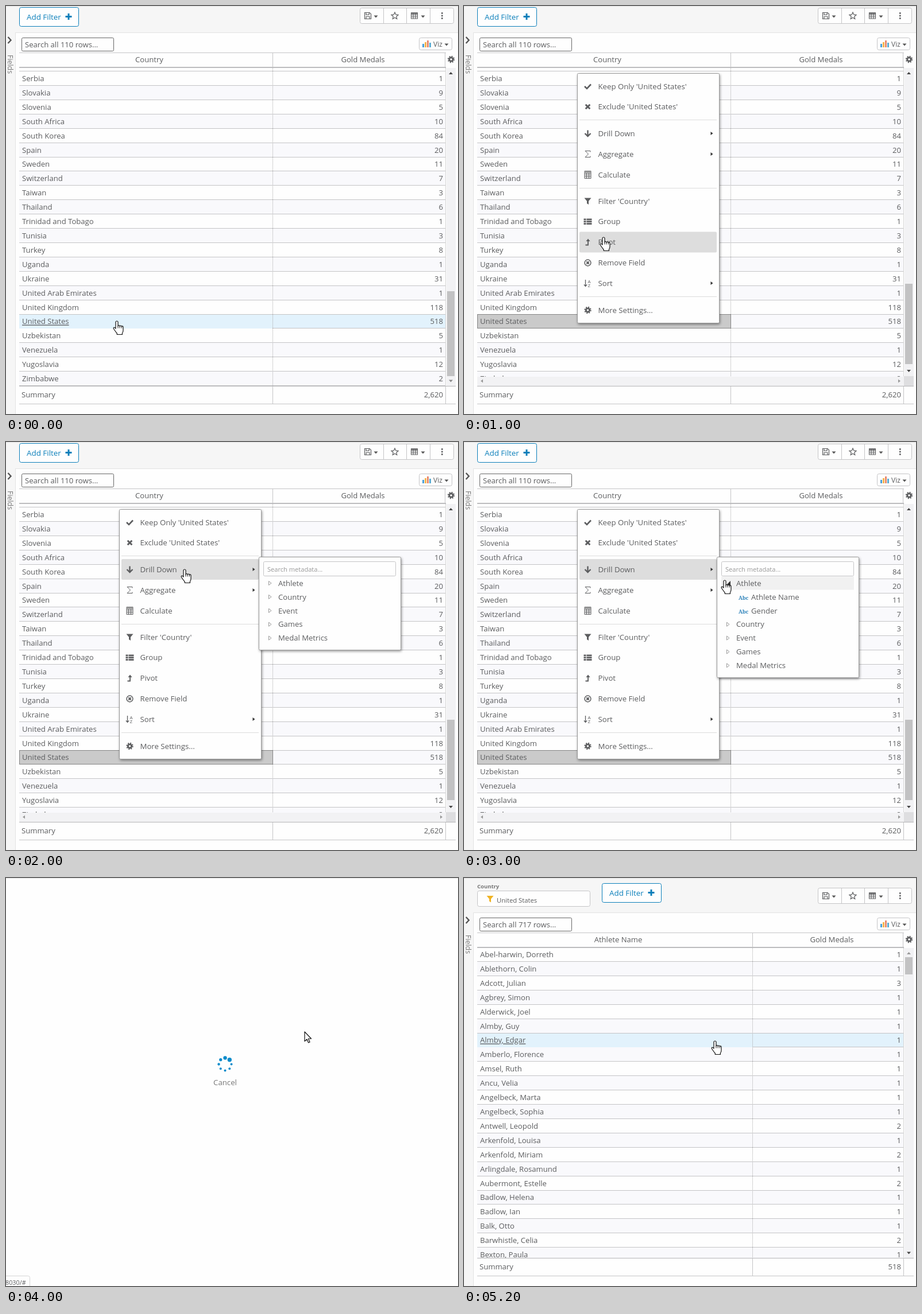
An HTML page that plays this animation: 787 px wide and 711 px high, repeating every 5400 ms.

```html
<!DOCTYPE html>
<html lang="en">
<head>
<meta charset="utf-8">
<title>Drill down</title>
<style>
html, body { margin: 0; width: 100%; height: 100%; overflow: hidden; background: #fefefe; }
svg { display: block; font-family: "Open Sans", "Noto Sans", sans-serif; font-size: 13.1px; }
text { white-space: pre; }
.float { filter: drop-shadow(1px 2px 2px rgba(0, 0, 0, .4)); }
</style>
</head>
<body>
<svg id="stage" width="787" height="711" viewBox="0 0 787 711"></svg>
<script>
const LOOP = 5400, STEP = 200;
const INK = '#5c5d5f', LINE = '#c4c4c6', BLUE = '#0b7fba', PAGE = '#f6f6f6', PAPER = '#fefefe', HOVER = '#e2f2fc';
const ROW = 24.91;

const countries = {
  title: 'Country', total: '2,620', rows: 110, split: 464, dy: 0, top: 108, first: 138,
  names: ['Serbia', 'Slovakia', 'Slovenia', 'South Africa', 'South Korea', 'Spain', 'Sweden', 'Switzerland',
    'Taiwan', 'Thailand', 'Trinidad and Tobago', 'Tunisia', 'Turkey', 'Uganda', 'Ukraine', 'United Arab Emirates',
    'United Kingdom', 'United States', 'Uzbekistan', 'Venezuela', 'Yugoslavia', 'Zimbabwe'],
  medals: [1, 9, 5, 10, 84, 20, 11, 7, 3, 6, 1, 3, 8, 1, 31, 1, 118, 518, 5, 1, 12, 2]
};
const athletes = {
  title: 'Athlete Name', total: '518', rows: 717, split: 502, dy: 14, top: 122, first: 145,
  names: ['Abel-harwin, Dorreth', 'Ablethorn, Colin', 'Adcott, Julian', 'Agbrey, Simon', 'Alderwick, Joel',
    'Almby, Guy', 'Almby, Edgar', 'Amberlo, Florence', 'Amsel, Ruth', 'Ancu, Velia', 'Angelbeck, Marta',
    'Angelbeck, Sophia', 'Antwell, Leopold', 'Arkenfold, Louisa', 'Arkenfold, Miriam', 'Arlingdale, Rosamund',
    'Aubermont, Estelle', 'Badlow, Helena', 'Badlow, Ian', 'Balk, Otto', 'Barwhistle, Celia', 'Bexton, Paula'],
  medals: [1, 1, 3, 1, 1, 1, 1, 1, 1, 1, 1, 1, 2, 1, 2, 1, 2, 1, 1, 1, 2, 1]
};

// Pointer position for every step of the loop.
const path = [
  [193, 549], [196, 552], [197, 552], [206, 520], [228, 452], [243, 403], [262, 345],
  [303, 236], [308, 227], [311, 223], [311, 222], [345, 222], [405, 226],
  [451, 239], [454, 241], [454, 241], [476, 250], [508, 264], [520, 268],
  [520, 268], [520, 268], [520, 268], [520, 268], [501, 275], [438, 283], [437, 284], [437, 284]
];
const at = { menu: 2, sub: 8, open: 14, load: 19, result: 22 };

const rect = (x, y, w, h, fill, more = '') =>
  `<rect x="${x}" y="${y}" width="${w}" height="${h}" fill="${fill}" ${more}/>`;
const box = (x, y, w, h, stroke, r = 3, fill = PAPER, more = '') =>
  rect(x + .5, y + .5, w, h, fill, `stroke="${stroke}" rx="${r}" ${more}`);
const text = (x, y, s, more = '') => `<text x="${x}" y="${y}" fill="${INK}" ${more}>${s}</text>`;
const shape = (d, fill = INK) => `<path d="${d}" fill="${fill}"/>`;
const stroke = (d, w = 1, color = INK, more = '') =>
  `<path d="${d}" fill="none" stroke="${color}" stroke-width="${w}" ${more}/>`;
const move = (x, y, s) => `<g transform="translate(${x} ${y})">${s}</g>`;
const dots = (x, y1, y2) => stroke(`M${x + .5} ${y1}V${y2}`, 1, '#aaa', 'stroke-dasharray="1 1"');
const caret = (x, y, color = '#555', s = 3.5, h = 4) =>
  shape(`M${x - s} ${y - h / 2}h${2 * s}l${-s} ${h}z`, color);
const caretUp = (x, y, color) => shape(`M${x - 3.5} ${y + 2}h7l-3.5 -4z`, color);
const side = (x, y, d = 3, color = '#333') => shape(`M${x} ${y - 3}l${d} 3l${-d} 3z`, color);
const ring = (r, w, more = '') => `<circle r="${r}" fill="none" stroke="${INK}" stroke-width="${w}" ${more}/>`;

const gear = ring(3.2, 2.8) + ring(5.2, 2, 'stroke-dasharray="2.04 2.04"');
const cross = s => `M${-s} ${-s}L${s} ${s}M${s} ${-s}L${-s} ${s}`;
const funnel = 'M-6 -5.5H6L1.5 0V6L-1.5 4V0Z';
const icons = {
  check: stroke('M-5.5 0l4 4l7 -7.5', 2.6),
  cross: stroke(cross(3.8), 3),
  down: stroke('M0 -5.5V4M-5 0L0 5L5 0', 2.4),
  sum: stroke('M4.5 -3.5V-5.5H-4.5L1 0L-4.5 5.5H4.5V3.5'),
  calc: stroke('M-5.5 -6.5h11v13h-11zM-5.5 -2.5h11M-5.5 .5h11M-5.5 3.5h11M-2 -2.5v9M2 -2.5v9') +
    rect(-5.5, -6.5, 11, 3, '#999'),
  funnel: shape(funnel),
  list: [-5, -1.2, 2.6].map(y => rect(-7, y, 4, 2.8, INK) + rect(-2, y, 9, 2.8, INK)).join(''),
  pivot: stroke('M-4 5H.5V-2', 1.9) + shape('M-3 -1.5L.5 -6L4 -1.5Z'),
  remove: ring(5.4, 1.5) + stroke(cross(2.2), 2),
  sort: stroke('M-4 -6V5M-6.5 2.5L-4 5.5L-1.5 2.5', 1.3) +
    text(0, -.3, 'A', 'font-size="8"') + text(0, 7, 'Z', 'font-size="8"'),
  gear
};

const menu = [
  [140, 'check', "Keep Only 'United States'"], [175.5, 'cross', "Exclude 'United States'"],
  [222, 'down', 'Drill Down', 1], [258, 'sum', 'Aggregate', 1], [294, 'calc', 'Calculate'],
  [340, 'funnel', "Filter 'Country'"], [375.5, 'list', 'Group'], [411.5, 'pivot', 'Pivot'],
  [447.5, 'remove', 'Remove Field'], [483, 'sort', 'Sort', 1], [530, 'gear', 'More Settings...']
];

function addFilter(x, y) {
  return box(x, y, 103, 33, BLUE) +
    text(x + 13, y + 22, 'Add Filter', `font-size="13.4" style="fill:${BLUE}"`) +
    stroke(`M${x + 80.5} ${y + 16.5}h11M${x + 86} ${y + 11}v11`, 3, BLUE);
}

function toolbar() {
  const star = Array.from({ length: 10 }, (_, i) => {
    const a = i * Math.PI / 5, r = i % 2 ? 2.9 : 6.3;
    return `${(r * Math.sin(a)).toFixed(2)} ${(-r * Math.cos(a)).toFixed(2)}`;
  }).join('L');
  return box(616, 3, 163, 27, LINE) +
    [657, 697, 738].map(x => rect(x, 4, 1, 26, LINE)).join('') +
    move(630, 17, stroke('M-5.5 -5.5h8.5l2.5 2.5v8.5h-11zM-3 -5v3.5h5v-3.5M-3 5.5v-4h6v4', 1.2)) +
    caret(644, 18.5) + move(677, 17.3, stroke(`M${star}Z`, 1.2)) +
    move(711, 17, stroke('M-5.5 -5h11v10h-11zM-5.5 -1.5h11M-5.5 1.8h11M-2 -5v10M2 -5v10', 1.1) +
      rect(-6, -5.5, 12, 2.4, INK)) + caret(726, 18.5) +
    [12.5, 17, 21.5].map(y => rect(758, y - 1.3, 2.6, 2.6, INK)).join('');
}

function panelTop(t) {
  const bars = [['#4a9fd8', 6], ['#f5b54f', 9], ['#e88a6e', 12], ['#5aaed6', 8]];
  return rect(16, 46, 771, 670, '#e3e3e3') + rect(17, 47, 770, 670, PAPER) +
    stroke('M3.5 54l5 5.5l-5 5.5', 2.4, '#555') +
    `<text transform="translate(2.5 85) rotate(90)" font-size="12.4" fill="#777">Fields</text>` +
    box(27, 55, 160, 23, '#666', 2) + text(33, 72, `Search all ${t.rows} rows...`) +
    box(719, 55, 57, 21, LINE) +
    bars.map(([c, h], i) => rect(725 + i * 4, 72 - h, 3, h, c)).join('') +
    text(744, 71, 'Viz', 'font-size="12"') + caret(767, 67.5) +
    rect(23, 81, 743, 1, LINE) + rect(23, 106, 743, 2, '#bcbcbe') +
    rect(t.split, 82, 1, 25, LINE) + rect(764, 82, 1, 25, LINE) +
    text(t.split / 2 + 17.5, 98, t.title, 'text-anchor="middle"') +
    text(t.split / 2 + 389.5, 98, 'Gold Medals', 'text-anchor="middle"') +
    move(775, 93, gear);
}

function table(t, hover, col, picked) {
  const edge = i => Math.round(t.first + ROW * i);
  let s = move(0, t.dy, panelTop(t));
  if (!t.dy) s += rect(23, 113, 742, 1, LINE);
  t.names.forEach((name, i) => {
    const y = i || !t.dy ? edge(i - 1) + 1 : t.top, base = t.first - 7 + ROW * i;
    const line = on => on ? 'text-decoration="underline"' : '';
    const fill = i === hover ? HOVER : i % 2 ? '#f9f9fc' : PAPER;
    s += rect(23, y, 742, edge(i) - y, fill) + rect(23, edge(i), 742, 1, LINE);
    // The cell under the pointer hides its lower border.
    if (i === hover) s += col ? rect(t.split, edge(i), 765 - t.split, 1, HOVER) : rect(23, edge(i), t.split - 23, 1, HOVER);
    if (picked && i === 17) s += box(23, y - 1, t.split - 23, ROW, '#858585', 0, '#cacaca');
    s += text(28, base, name, line(i === hover && col === 0)) +
      text(761, base, t.medals[i], 'text-anchor="end" ' + line(i === hover && col === 1));
  });
  s += dots(t.split, t.top, 662) + dots(765, t.top, 662) + rect(17, 662, 770, 49, PAPER);
  if (picked) s += box(23, edge(16), t.split - 23, 24, '#858585', 0, 'none');
  return s + rect(23, 662, 760, 1, '#b5b5b7') + rect(23, 693, 760, 1, LINE) +
    rect(t.split, 663, 1, 30, LINE) + rect(765, 663, 1, 30, LINE) +
    text(27, 682, 'Summary') + text(761, 682, t.total, 'text-anchor="end"');
}

function scrollbar(top, from, to, end, upColor, downColor) {
  return rect(767, top, 16, 662 - top, '#f2f2f4') + rect(768, from, 13, to - from, '#c2c2c3') +
    caretUp(774.5, top + 9, upColor) + caret(774.5, end, downColor);
}

function sideScroll() {
  return rect(23, 646, 744, 16, '#f2f2f4') + side(33, 653.5, -4, '#999') + side(756, 653.5, 4, '#999');
}

function contextMenu(y, drill) {
  let s = box(197, 117, 247, 435, '#9a9a9a', 2, PAPER, 'class="float"') +
    [198, 317, 506].map(v => rect(201, v, 239, 1, '#dcdcdc')).join('');
  for (const [mid, icon, label, more] of menu) {
    const on = drill ? icon === 'down' : Math.abs(y - mid) < 18;
    if (on) s += rect(201, mid - 18, 239, 36, '#dddddd', 'rx="2"');
    s += move(215.5, mid, icons[icon]) + text(233.5, mid + 4.7, label, 'font-size="13.2"');
    if (more) s += side(429.5, mid, 4);
  }
  return s;
}

function subMenu(x, y, open) {
  const kids = open ? ['Athlete Name', 'Gender'] : [];
  const items = ['Athlete', ...kids, 'Country', 'Event', 'Games', 'Medal Metrics'];
  let s = box(440, 200, 247, open ? 210 : 162, '#9a9a9a', 2, PAPER, 'class="float"') +
    box(448, 208, 230, 25, LINE, 2) +
    text(455, 226, 'Search metadata...', 'font-size="11.1" style="fill:#999"');
  items.forEach((label, i) => {
    const mid = 246 + i * 23.9, kid = kids.includes(label);
    if (x > 447 && Math.abs(y - mid) < 12) s += rect(448, mid - 11.5, 231, 23, '#f1f1f1');
    if (kid) s += text(478, mid + 5, 'Abc', 'font-family="Noto Serif, serif" font-size="9" font-weight="700" style="fill:#2a80b9"');
    else if (open && !i) s += shape('M456 250h8v-8z', '#333');
    else s += stroke(`M457.5 ${mid - 3.5}l4.5 3.5l-4.5 3.5z`, 1, '#999');
    s += text(kid ? 500 : 474, mid + 4.7, label);
  });
  return s;
}

function loader(phase) {
  const sizes = [3.7, 3.2, 2.6, 2.2];
  let s = rect(0, 0, 787, 711, PAPER) + rect(0, 0, 787, 1, '#e6e6e6');
  for (let i = 0; i < 8; i++) {
    const a = (phase - i) * Math.PI / 4;
    s += `<circle cx="${381.5 + 11 * Math.sin(a)}" cy="${324.5 - 11 * Math.cos(a)}" r="${sizes[i] || 2}" fill="#0d8ccb"/>`;
  }
  return s + text(381.5, 361, 'Cancel', 'font-size="13.2" text-anchor="middle" style="fill:#777"') +
    box(-5, 693, 46, 24, '#d5d5d5') + text(-1, 709, '8030/#', 'font-size="10.8"');
}

const outline = d => `<path d="${d}" fill="#fff" stroke="#111" stroke-width="1.2" stroke-linejoin="round"/>`;
const hand = outline('M-2 13V2a2 2 0 0 1 4 0V9q0 -1.5 1.6 -1.5q1.6 0 1.6 1.8q0 -1.3 1.6 -1.3q1.6 0 1.6 1.8' +
  'q.2 -1 1.3 -1q1.3 0 1.3 1.8V16q0 3 -1.6 5V23.5H.3V21.5Q-1.5 19.5 -3.5 16.5L-5.6 13.5Q-6.3 11.5 -5 11Q-4 10.8 -2 13Z') +
  stroke('M2 8.5v4M5.2 9v3.5M8.4 9.5v3', 1, '#111');
const arrow = outline('M0 0V16.5L4 13L6.5 19L9 18L6.5 12H11.5Z');

function draw(n) {
  const [x, y] = path[n], loading = n >= at.load && n < at.result;
  const hasMenu = n >= at.menu && n < at.load;
  if (loading) return loader((n - at.load) * 2 - 1) + move(x, y, arrow);
  let s = rect(0, 0, 787, 711, PAGE) + rect(0, 0, 787, 1, '#e4e4e4');
  if (n < at.load) {
    s += addFilter(23, 2) + toolbar() + table(countries, hasMenu ? -1 : 17, 0, hasMenu);
    s += hasMenu ? sideScroll() + scrollbar(108, 484, 624, 636, '#444', '#444') + rect(766, 645, 17, 17, '#dedee0')
      : scrollbar(108, 497, 645, 653.5, '#444', '#888');
    if (hasMenu) s += contextMenu(y, n >= at.sub);
    if (n >= at.sub) s += subMenu(x, y, n >= at.open);
  } else {
    const row = Math.ceil((y - 2 - athletes.first) / ROW);
    s += text(23, 18, 'Country', 'font-size="9.5" font-weight="700" style="fill:#777"') +
      box(23, 22, 196, 27, LINE) + move(45.5, 36.5, shape(funnel, '#f0b323')) +
      text(57, 42.5, 'United States', 'font-size="11.25"') +
      addFilter(240, 9) + move(0, 14, toolbar()) +
      table(athletes, row, x > athletes.split ? 1 : 0, false) + scrollbar(122, 138, 168, 653.5, '#999', '#444');
  }
  return s + move(x, y, hand);
}

const stage = document.getElementById('stage');
let shown = -1;
function tick() {
  const n = Math.floor(performance.now() % LOOP / STEP);
  if (n !== shown) stage.innerHTML = draw(shown = n);
  requestAnimationFrame(tick);
}
tick();
</script>
</body>
</html>
```
